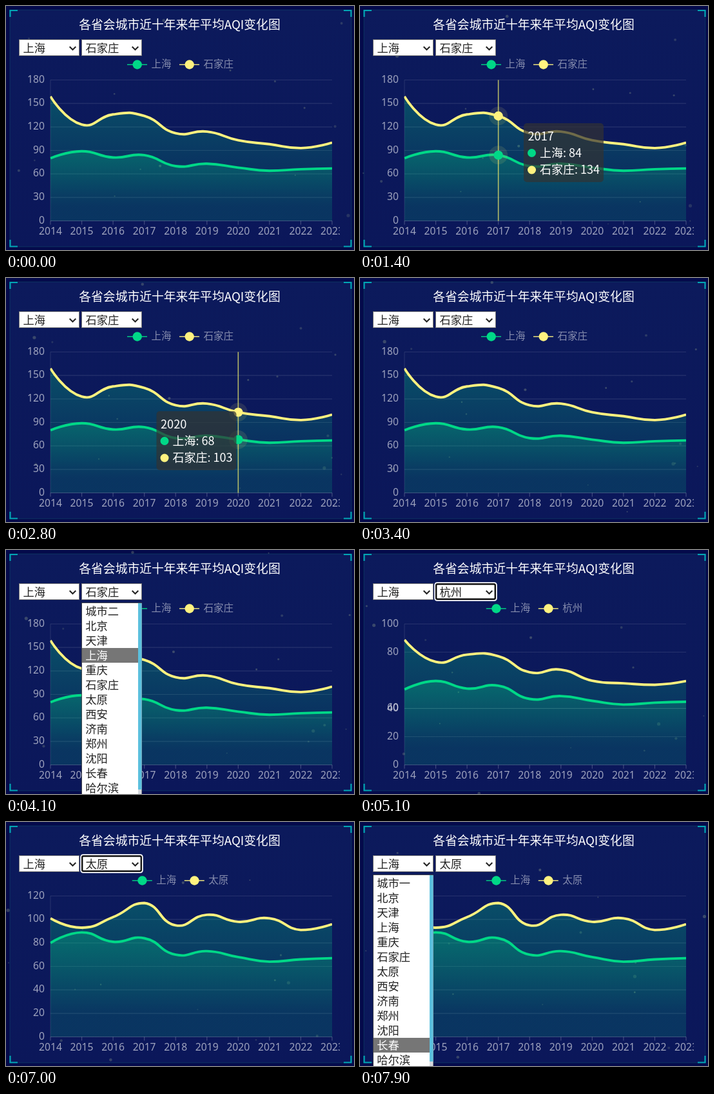
Recreate the animation shown at these times as an HTML page. Size 540 px wide and 381 px high, loop 8 s.

```html
<!DOCTYPE html>
<html lang="zh">
<head>
<meta charset="utf-8">
<style>
html, body { margin: 0; width: 100%; height: 100%; overflow: hidden; background: #040a4b; }
svg { display: block; width: 540px; height: 381px; font-family: "Noto Sans CJK SC", "Noto Sans CJK", "Noto Sans", sans-serif; }
.num { font-family: "Noto Sans", "Open Sans", sans-serif; }
</style>
</head>
<body>
<svg viewBox="0 0 540 381">
  <defs>
    <linearGradient id="panel" x1="0" y1="0" x2="0" y2="1">
      <stop offset="0" stop-color="#0c1a5c"/>
      <stop offset="1" stop-color="#0b175a"/>
    </linearGradient>
    <clipPath id="plot"><rect x="68.5" y="100" width="437.5" height="236"/></clipPath>
    <clipPath id="chart"><rect x="20" y="80" width="498" height="290"/></clipPath>
  </defs>
  <rect width="540" height="381" fill="#040a4b"/>
  <rect x="6" y="6" width="530" height="370" fill="url(#panel)" stroke="#19ba8b" stroke-opacity=".2"/>
  <g id="dots"></g>
  <path d="M6.5 17V7H18M524 7h11.500v10M6.500 365v10.500H18M524 375.500h11.500V365" fill="none" stroke="#02a6b5" stroke-width="2.200"/>
  <g id="scene"></g>
</svg>
<script>
const LOOP = 8000, STEP = 100;
const LEFT = 69, RIGHT = 506, TOP = 115.5, BASE = 335.5;
const GREEN = '#00d887', YELLOW = '#fff27f';
const HOME = '上海';
const home = [80, 89, 81, 84, 70, 73, 68, 64, 66, 67];
const views = [
  { start: -1000, city: '石家庄', max: 180, gap: 30, data: [159, 123, 136, 134, 112, 114, 103, 98, 93, 100] },
  { start: 5072, city: '杭州', max: 100, gap: 20, data: [90, 87, 86, 85, 76, 80, 67, 68, 72, 71] },
  { start: 6572, city: '太原', max: 120, gap: 20, data: [101, 93, 102, 114, 95, 104, 98, 101, 91, 96] }
];
const cities = ['北京', '天津', '上海', '重庆', '石家庄', '太原', '西安', '济南', '郑州', '沈阳', '长春', '哈尔滨'];

// Each menu: select index, open and close time, highlighted row over time
const menus = [
  { box: 1, from: 3700, to: 5000, rows: [[3700, 5], [3800, 5], [3900, 1], [4100, 3], [4800, 14]] },
  { box: 1, from: 5700, to: 6500, rows: [[5700, 14], [5800, 1], [6200, 6]] },
  { box: 0, from: 7100, to: 8000, rows: [[7100, 3], [7200, 3], [7300, 1], [7900, 11]] }
];
const pointer = [[700, 82, 205], [1400, 234, 163], [2100, 310, 172], [2800, 377.5, 188], [3100, 345, 168], [3400, 225, 118]];
const boxX = [20, 117];

const $ = id => document.getElementById(id);
const lerp = (a, b, p) => a + (b - a) * p;
const xAt = i => lerp(LEFT, RIGHT, i / 9);
const yAt = (v, max) => BASE - (BASE - TOP) * v / max;

function sample(keys, t, k = 1) {
  let i = 0;
  while (i < keys.length - 2 && t >= keys[i + 1][0]) i++;
  const a = keys[i], b = keys[i + 1];
  const p = Math.min(1, Math.max(0, (t - a[0]) / (b[0] - a[0])));
  return lerp(a[k], b[k], p);
}

const text = (x, cy, s, size, fill, extra = '') =>
  `<text x="${x}" y="${cy + size * .36}" font-size="${size}" fill="${fill}" ${extra}>${s}</text>`;
const rect = (x, y, w, h, fill, extra = '') =>
  `<rect x="${x}" y="${y}" width="${w}" height="${h}" fill="${fill}" ${extra}/>`;
const circle = (x, y, r, fill, extra = '') =>
  `<circle cx="${x}" cy="${y}" r="${r}" fill="${fill}" ${extra}/>`;
const line = (x1, y1, x2, y2, stroke, w = 1.2) =>
  `<path d="M${x1} ${y1}L${x2} ${y2}" stroke="${stroke}" stroke-width="${w}"/>`;

// Smooth curve; control points stay inside the range of the points
function curve(ys) {
  const lo = Math.min(...ys), hi = Math.max(...ys);
  const clamp = y => Math.min(hi, Math.max(lo, y));
  const dx = xAt(1) - xAt(0);
  let c0 = [LEFT, ys[0]], d = `M${LEFT} ${ys[0]}`;
  for (let i = 1; i < ys.length; i++) {
    const x = xAt(i), y = ys[i];
    let c1 = [x, y], next = c1;
    if (i < ys.length - 1) {
      const before = Math.hypot(dx, y - ys[i - 1]), after = Math.hypot(dx, ys[i + 1] - y);
      const r = after / (before + after), vy = ys[i + 1] - ys[i - 1];
      c1 = [x - dx * (1 - r), clamp(y - vy * .5 * (1 - r))];
      next = [x + dx * r, clamp(y + vy * .5 * r)];
    }
    d += `C${c0} ${c1} ${x} ${y}`;
    c0 = next;
  }
  return d;
}

function series(ys, color, id) {
  const d = curve(ys);
  return `<linearGradient id="${id}" gradientUnits="userSpaceOnUse" x1="0" x2="0" y1="${Math.min(...ys)}" y2="${BASE}">
    <stop offset="0" stop-color="${GREEN}" stop-opacity=".28"/><stop offset=".8" stop-color="${GREEN}" stop-opacity=".08"/></linearGradient>
    <g clip-path="url(#plot)"><path d="${d}L${RIGHT} ${BASE}H${LEFT}Z" fill="url(#${id})"/>
    <path d="${d}" fill="none" stroke="${color}" stroke-width="3.900" stroke-linejoin="round"/></g>`;
}

function legend(city) {
  const size = 15.5, grey = 'rgba(255,255,255,.5)';
  let x = 188 + (3 - city.length) * size / 2, out = '';
  for (const [name, color] of [[HOME, GREEN], [city, YELLOW]]) {
    out += line(x, 91.5, x + 31, 91.5, color, 1.4) + circle(x + 15.7, 91.5, 7.2, color)
      + text(x + 37.5, 90.5, name, size, grey, 'font-weight="500"');
    x += 81;
  }
  return out;
}

function axes(view, prev, p) {
  const grey = 'rgba(255,255,255,.6)';
  let out = line(LEFT, TOP, LEFT, BASE, 'rgba(255,255,255,.1)');
  for (let v = 0; v <= view.max; v += view.gap) {
    let y = yAt(v, view.max);
    if (v <= prev.max && v % prev.gap === 0) y = lerp(yAt(v, prev.max), y, p);
    out += line(LEFT, y, RIGHT, y, `rgba(255,255,255,${v ? .11 : .22})`)
      + text(60, y - 1.5, v, 15.7, grey, 'class="num" text-anchor="end"');
  }
  for (let i = 0; i < 10; i++) {
    out += line(xAt(i), BASE, xAt(i), BASE + 6, 'rgba(255,255,255,.22)')
      + text(xAt(i), 351.5, 2014 + i, 15.7, grey, 'class="num" text-anchor="middle"');
  }
  return out;
}

function hover(t, view, ys) {
  if (t < 700 || t >= 3400) return '';
  const px = sample(pointer, t), py = sample(pointer, t, 2);
  const i = Math.round((px - LEFT) / (RIGHT - LEFT) * 9), x = xAt(i);
  let out = line(x, TOP, x, BASE, 'rgba(221,220,107,.8)', 1.6);
  ys.forEach((y, k) => {
    out += circle(x, y[i], 14.5, 'rgba(221,220,107,.13)') + circle(x, y[i], 7.2, k ? YELLOW : GREEN);
  });
  const w = view.data[i] > 99 ? 124 : 114;
  const bx = px + 20 + w > 518 ? px - 20 - w : px + 20, by = py + 20;
  out += rect(bx, by, w, 92, 'rgba(50,50,50,.7)', 'rx="5"') + text(bx + 6.5, by + 20, 2014 + i, 18.2, '#fff');
  [[HOME, home[i], GREEN], [view.city, view.data[i], YELLOW]].forEach(([name, v, color], k) => {
    const cy = by + 46.5 + 26.5 * k;
    out += circle(bx + 12.5, cy, 6.5, color) + text(bx + 25, cy, `${name}: ${v}`, 18, '#fff');
  });
  return out;
}

function select(k, value, focused) {
  const x = boxX[k], cx = x + 83.5;
  const frame = focused
    ? rect(x - .5, 51.5, 95, 27, '#fff', 'rx="3" stroke="#fff" stroke-width="2.500"')
      + rect(x + 1.2, 53.2, 91.6, 23.6, '#fff', 'rx="2" stroke="#101010" stroke-width="2.400"')
    : rect(x + .5, 52.5, 93, 25, '#fff', 'stroke="#767676"');
  return frame + text(x + 6.5, 66, value, 17.3, '#222')
    + `<path d="M${cx - 4.8} 63.500l4.800 4.800l4.800 -4.800" fill="none" stroke="#222" stroke-width="2"/>`;
}

function menu(m, t) {
  const x = boxX[m.box] + .5, hot = Math.round(sample(m.rows, t));
  let out = rect(x, 82.5, 93, 310, '#fff', 'stroke="#333" stroke-width=".8"');
  [m.box ? '城市二' : '城市一', ...cities].forEach((name, i) => {
    const y = 84 + 23 * i;
    if (i === hot) out += rect(x + .5, y, 87, 23, '#767676');
    out += text(x + 5.8, y + 12, name, 17.3, i === hot ? '#fff' : '#222');
  });
  return out + rect(x + 87.5, 83, 5.5, 300, '#d5d9df') + rect(x + 87.5, 83, 5.5, 291, '#5bc0de');
}

function random(seed) {
  return () => (seed = (seed * 16807) % 2147483647) / 2147483647;
}
const rnd = random(4711);
const dots = Array.from({ length: 18 }, () => ({
  x: rnd() * 540, y: rnd() * 381, vx: (rnd() - .5) * .06, vy: (rnd() - .5) * .06,
  r: 1 + rnd() * rnd() * 2.4, a: .15 + rnd() * .2
}));
const wrap = (v, n) => ((v % n) + n) % n;

function draw(t) {
  $('dots').innerHTML = dots.map(d =>
    circle(wrap(d.x + d.vx * t, 540), wrap(d.y + d.vy * t, 381), d.r, '#9aab8c', `opacity="${d.a}"`)).join('');

  const n = views.filter(v => t >= v.start).length - 1;
  const view = views[n], prev = views[Math.max(0, n - 1)];
  const p = 1 - (1 - Math.min(1, (t - view.start) / 300)) ** 3;
  const blend = (a, b) => a.map((v, i) => lerp(yAt(v, prev.max), yAt(b[i], view.max), p));
  const ys = [blend(home, home), blend(prev.data, view.data)];
  const open = menus.find(m => t >= m.from && t < m.to);
  const focused = !open && t >= 5000 && t < 7100;

  $('scene').innerHTML =
    text(269.5, 29, '各省会城市近十年来年平均AQI变化图', 18.8, '#fff', 'text-anchor="middle" font-weight="500"')
    + `<g clip-path="url(#chart)">${axes(view, prev, p)}${series(ys[0], GREEN, 'fillA')}${series(ys[1], YELLOW, 'fillB')}${legend(view.city)}</g>`
    + hover(t, view, ys)
    + select(0, HOME, false) + select(1, view.city, focused)
    + (open ? menu(open, t) : '');
}

let shown = -1;
function tick() {
  const t = Math.floor(performance.now() % LOOP / STEP) * STEP;
  if (t !== shown) draw(shown = t);
  requestAnimationFrame(tick);
}
tick();
</script>
</body>
</html>
```
